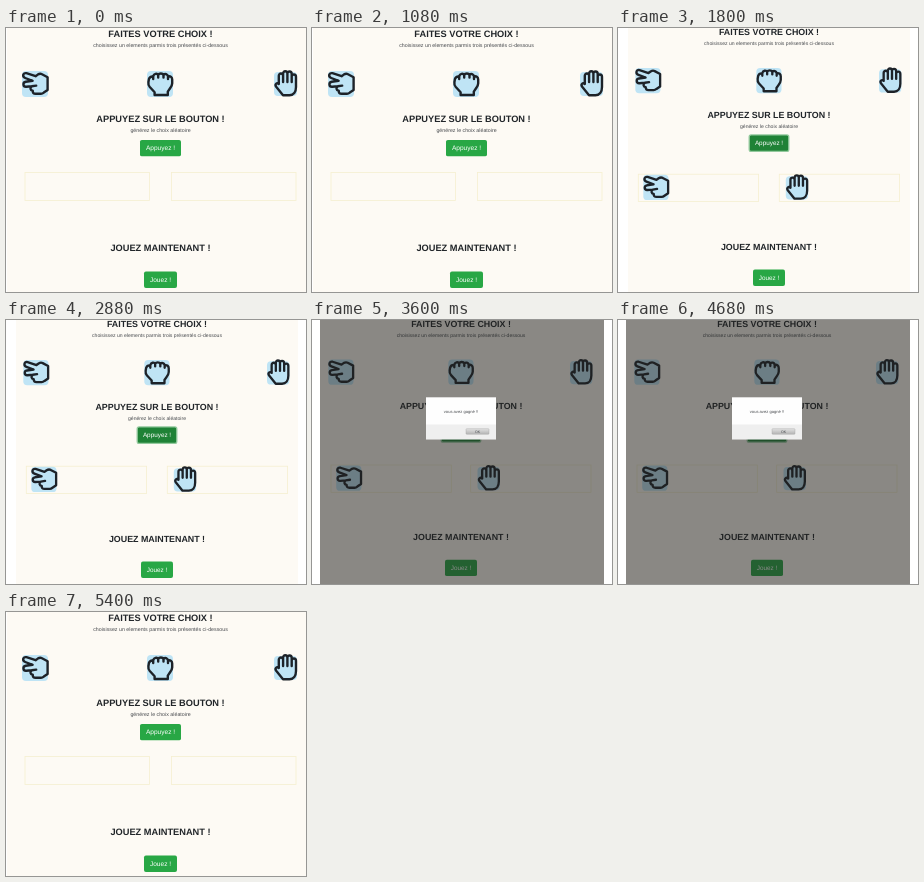
These frames come from a looping animation (300 px wide and 264 px high, 7.2 s). An HTML page:

```html
<!DOCTYPE html>
<html lang="fr">
<head>
<meta charset="utf-8">
<title>Jeu</title>
<style>
html, body { margin: 0; width: 100%; height: 100%; overflow: hidden; background: #fff; }
svg { display: block; width: 300px; height: 264px; }
text {
  font-family: "Liberation Sans", Arial, sans-serif; text-anchor: middle;
  text-rendering: geometricPrecision; fill: #212529;
}
.title { font-weight: bold; }
.note { fill: #484b4f; }
.label { fill: #fff; }
.ink { fill: none; stroke: #1d2228; stroke-width: 2.4; stroke-linecap: round; stroke-linejoin: round; }
.sky { fill: #bfe4f5; }
</style>
</head>
<body>
<svg viewBox="0 0 300 264">
  <defs>
    <linearGradient id="grey" x2="0" y2="1">
      <stop offset="0" stop-color="#e2e2e2"/><stop offset="1" stop-color="#b2b2b2"/>
    </linearGradient>
    <g id="scissors">
      <rect class="sky" width="26" height="26" rx="4"/>
      <path class="ink" d="M25.6 6.2 L20 3.2 Q18 2.2 15.8 3.6 L13.6 5.2 L4.4 2.2 C.8 1.4 0 5.8 3.2 7 L10.6 9.8 L3.8 10.8 C.4 11.4 .8 15.9 4.2 15.7 L9.8 15.2 C7.8 16.6 8 19.4 10.8 19.8 C10.6 21.8 11.6 22.8 13.6 22.8 L19 22.8 Q20.4 22.8 21.8 21.6 L25.6 19 Z M9.8 15.2 L14.2 14.6"/>
    </g>
    <g id="fist">
      <rect class="sky" width="26" height="26" rx="4"/>
      <path class="ink" d="M7.6 24 V21.2 L2.8 16 Q1 13.8 1.4 11.2 L1.9 8.2 Q2.8 5.2 6.2 5.6 C6.6 2.4 10.2 2 11.2 3.9 C12.2 2 15.6 2 16.5 3.9 C18 2.4 20.6 3 21 5.4 C23.6 4.9 25.2 6.2 25.2 8.6 V12.4 Q25 14.8 23.4 16.8 L20.8 20.6 V24 Z M6.2 5.6 V8 M11.2 3.9 V6.6 M16.5 3.9 V6.6 M21 5.4 V8"/>
    </g>
    <g id="paper">
      <rect class="sky" y="2" width="23" height="24" rx="4"/>
      <path class="ink" d="M9 25.2 L2.2 16.8 C.4 14.2 2.8 12.2 4.8 14 V5.8 C4.8 2.8 9.1 2.8 9.1 5.8 V3.6 C9.1 .4 13.4 .4 13.4 3.6 C13.4 .8 17.7 .8 17.7 4 V6.6 C17.7 3.8 22 3.8 22 6.8 V17 C22 22 19.5 25.2 15.5 25.2 Z M9.1 5.8 V12 M13.4 3.6 V12 M17.7 6.6 V12"/>
    </g>
  </defs>
  <g id="stage"></g>
</svg>
<script>
const HOLD = 1800;
const stage = document.getElementById("stage");

const rect = (x, y, w, h, fill, more = "") =>
  `<rect x="${x}" y="${y}" width="${w}" height="${h}" fill="${fill}" ${more}/>`;
const text = (kind, x, y, size, words) =>
  `<text class="${kind}" x="${x}" y="${y}" font-size="${size}">${words}</text>`;
const icon = (name, [x, y], scale) =>
  `<use href="#${name}" transform="translate(${x} ${y}) scale(${scale})"/>`;
const button = (mid, y, w, size, words, fill = "#28a745", more = "") =>
  rect(mid - w / 2, y, w, 16.4, fill, `rx="1.9" ${more}`) +
  text("label", mid, y + 10.5, size, words);

function page(p) {
  const [title, note, label] = p.sizes;
  const [y1, y2, y3, y4, y5] = p.lines;
  const frame = x => rect(x, p.box.y, p.box.w, p.box.h, "none",
    'stroke="#f6efd0" stroke-width=".8"');
  const pressed = p.picks
    ? ["#1f8236", 'stroke="#93c99d" stroke-width="1.3"'] : [];
  return rect(p.left, 0, p.right - p.left, 264, "#fdfaf4") +
    text("title", p.mid, y1, title, "FAITES VOTRE CHOIX !") +
    text("note", p.mid, y2, note, "choisissez un elements parmis trois présentés ci-dessous") +
    icon("scissors", p.hands[0], p.scale) +
    icon("fist", p.hands[1], p.scale) +
    icon("paper", p.hands[2], p.scale) +
    text("title", p.mid, y3, title, "APPUYEZ SUR LE BOUTON !") +
    text("note", p.mid, y4, note, "générez le choix aléatoire") +
    button(p.mid, p.buttons[0], p.widths[0], label, "Appuyez !", ...pressed) +
    p.box.x.map(frame).join("") +
    (p.picks ? icon("scissors", p.picks[0], p.scale) + icon("paper", p.picks[1], p.scale) : "") +
    text("title", p.mid, y5, title, "JOUEZ MAINTENANT !") +
    button(p.mid, p.buttons[1], p.widths[1], label, "Jouez !");
}

const dialog = () =>
  rect(8, 0, 284, 264, "#212120", 'opacity=".52"') +
  rect(114, 77.3, 70, 42, "#fefefe") +
  rect(114, 104.5, 70, 14.8, "#efefef") +
  text("note", 149, 92.8, 4.1, "vous avez gagné !!") +
  rect(154, 108.7, 23, 5.6, "url(#grey)", 'rx=".8" stroke="#a2a2a2" stroke-width=".4"') +
  text("note", 165.5, 112.9, 3.6, "OK");

const start = page({
  left: 1, right: 300, mid: 154.5, scale: 1,
  sizes: [9.25, 5.29, 6.55], lines: [8.8, 19, 93.8, 104.3, 222.6],
  hands: [[16, 43], [141, 43], [268, 42]],
  buttons: [111.9, 243.5], widths: [41, 33],
  box: { x: [19, 165.5], y: 144.4, w: 124.5, h: 28.2 }
});
const chosen = page({
  left: 10, right: 292, mid: 151, scale: .97,
  sizes: [8.9, 5.1, 6.35], lines: [7.2, 17.4, 89.7, 99.9, 221.7],
  hands: [[17.3, 40], [138.3, 40], [261, 39.3]],
  buttons: [106.9, 241.6], widths: [39.6, 32],
  box: { x: [20.3, 161.3], y: 146.2, w: 120.3, h: 27.3 },
  picks: [[25.3, 146.8], [167.8, 146.2]]
});
const won = page({
  left: 8, right: 292, mid: 149, scale: .97,
  sizes: [8.85, 5.06, 6.35], lines: [7.2, 17.4, 88.8, 99, 220.2],
  hands: [[16.3, 39.6], [136.3, 39.6], [258, 39]],
  buttons: [105.7, 239.7], widths: [39.6, 32],
  box: { x: [19, 158.7], y: 145, w: 120.3, h: 27.3 },
  picks: [[24.2, 145.6], [165.5, 145]]
}) + dialog();

const scenes = [start, chosen, won, start];
let shown = -1;

function draw(time) {
  const step = Math.floor(time / HOLD) % scenes.length;
  if (step !== shown) {
    stage.innerHTML = scenes[step];
    shown = step;
  }
}

const begin = performance.now();
function tick() {
  draw(performance.now() - begin);
  requestAnimationFrame(tick);
}
tick();
</script>
</body>
</html>
```
